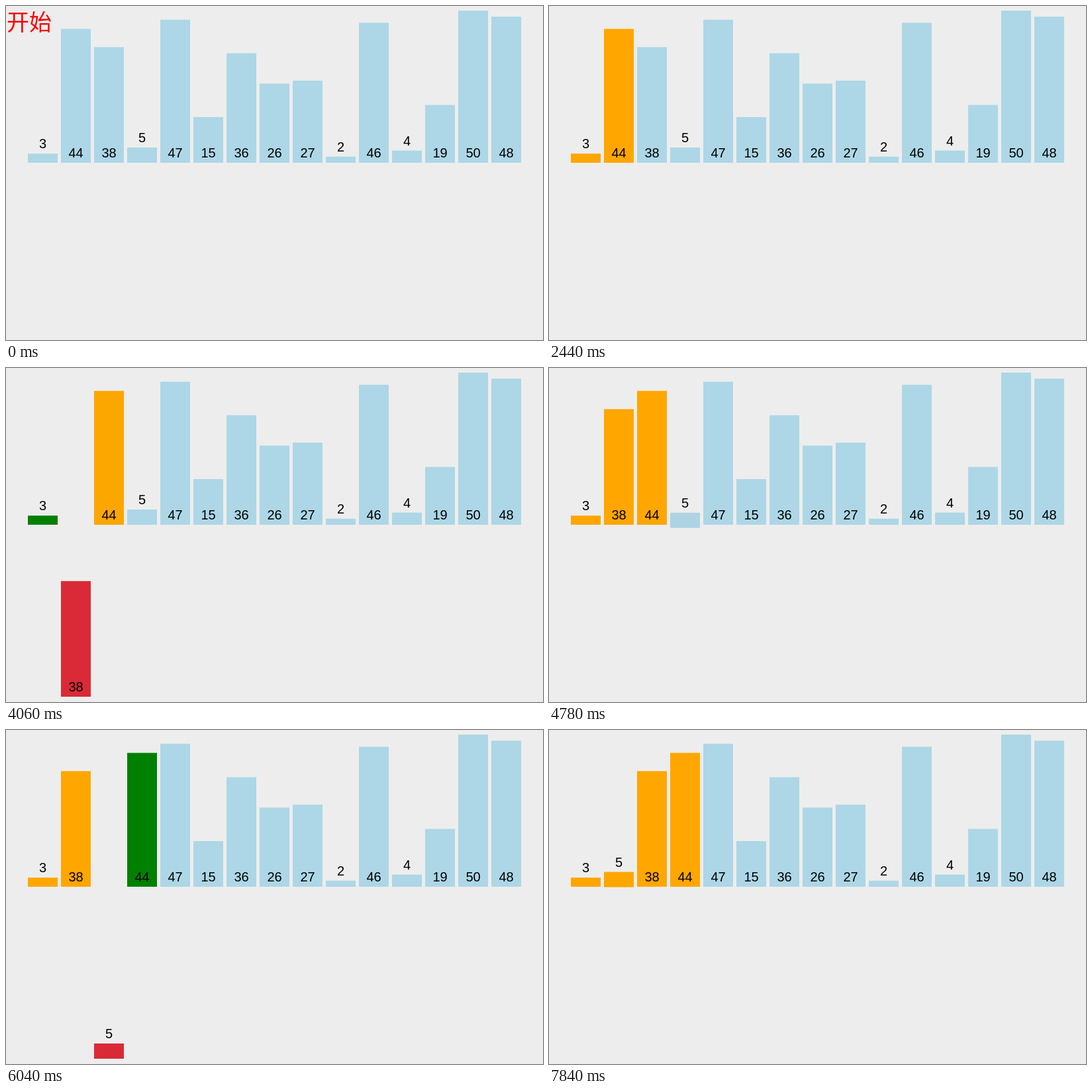
Animation of 811 by 505 pixels, one loop 8000 ms. Source, as an HTML page:

```html
<!DOCTYPE html>
<html lang="zh">
<head>
<meta charset="utf-8">
<title>Insertion sort</title>
<style>
  html, body { margin: 0; width: 100%; height: 100%; overflow: hidden; background: #ededed; }
  svg { display: block; width: 811px; height: 505px; }
  .num { font: 20px "Liberation Sans", Arial, sans-serif; text-anchor: middle; }
  #title { font: 34px "Noto Sans CJK SC", "Noto Sans CJK", sans-serif; fill: #f00; }
</style>
</head>
<body>
<svg viewBox="0 0 811 505">
  <g id="bars"></g>
  <text id="title" x="1" y="37">开始</text>
</svg>
<script>
const VALUES = [3, 44, 38, 5, 47, 15, 36, 26, 27, 2, 46, 4, 19, 50, 48];
const BLUE = [173, 215, 230], ORANGE = [255, 166, 0], GREEN = [0, 128, 0], RED = [218, 42, 56];
const LEFT = 33, PITCH = 50, WIDTH = 45, BASE = 237, UNIT = 4.6, DROP = 260;
const LOOP = 8000, INTRO = 1000, TICK = 180;

// When each sorting move begins and how long it lasts, in ticks after the intro
const STARTS = [-0.35, 1.97, 4.28, 6.6, 8.9, 11.22, 13.6, 15.97,
                18.25, 20.8, 23.67, 26.33, 28.95, 31.65, 34.3, 36.9];
const MOVE = 1.2;

const states = recordSort(3);
const bars = VALUES.map(makeBar);
const title = document.getElementById("title");

function recordSort(passes) {
  const row = VALUES.map((value, slot) => ({ value, slot, drop: 0, color: BLUE }));
  const log = [];
  const byId = row.slice();
  const save = () => log.push(byId.map(b => ({ ...b })));

  save();
  row[0].color = ORANGE;
  save();
  for (let i = 1; i <= passes; i++) {
    const key = row[i];
    key.color = RED;
    key.drop = DROP;
    save();
    for (let j = i - 1; j >= 0; j--) {
      const other = row[j];
      other.color = GREEN;
      save();
      if (other.value <= key.value) {
        other.color = ORANGE;
        break;
      }
      [row[j], row[j + 1]] = [key, other];
      key.slot = j;
      other.slot = j + 1;
      save();
      other.color = ORANGE;
    }
    key.color = ORANGE;
    key.drop = 0;
    save();
  }
  return log;
}

function add(parent, name, attrs) {
  const el = document.createElementNS("http://www.w3.org/2000/svg", name);
  for (const key in attrs) el.setAttribute(key, attrs[key]);
  return parent.appendChild(el);
}

function makeBar(value) {
  const height = value * UNIT;
  const group = add(document.getElementById("bars"), "g", {});
  const rect = add(group, "rect", { y: BASE - height, width: WIDTH, height });
  const labelY = height < 30 ? BASE - height - 8 : BASE - 8;
  add(group, "text", { class: "num", x: WIDTH / 2, y: labelY }).textContent = value;
  return { group, rect };
}

const mix = (a, b, f) => a + (b - a) * f;

function cubicInOut(t) {
  t = Math.min(1, Math.max(0, t));
  return t < 0.5 ? 4 * t ** 3 : 1 - 4 * (1 - t) ** 3;
}

function draw(ms) {
  const tick = Math.floor((ms - INTRO) / TICK);
  const step = Math.max(0, STARTS.filter(s => s <= tick).length - 1);
  const f = cubicInOut((tick - STARTS[step]) / MOVE);

  title.setAttribute("visibility", ms < INTRO ? "visible" : "hidden");
  bars.forEach(({ group, rect }, i) => {
    const from = states[step][i], to = states[step + 1][i];
    const x = LEFT + PITCH * mix(from.slot, to.slot, f);
    const color = from.color.map((c, n) => Math.round(mix(c, to.color[n], f)));
    group.setAttribute("transform", `translate(${x} ${mix(from.drop, to.drop, f)})`);
    rect.setAttribute("fill", `rgb(${color})`);
  });
}

const origin = performance.now();
function frame() {
  draw((performance.now() - origin) % LOOP);
  requestAnimationFrame(frame);
}
frame();
</script>
</body>
</html>
```
